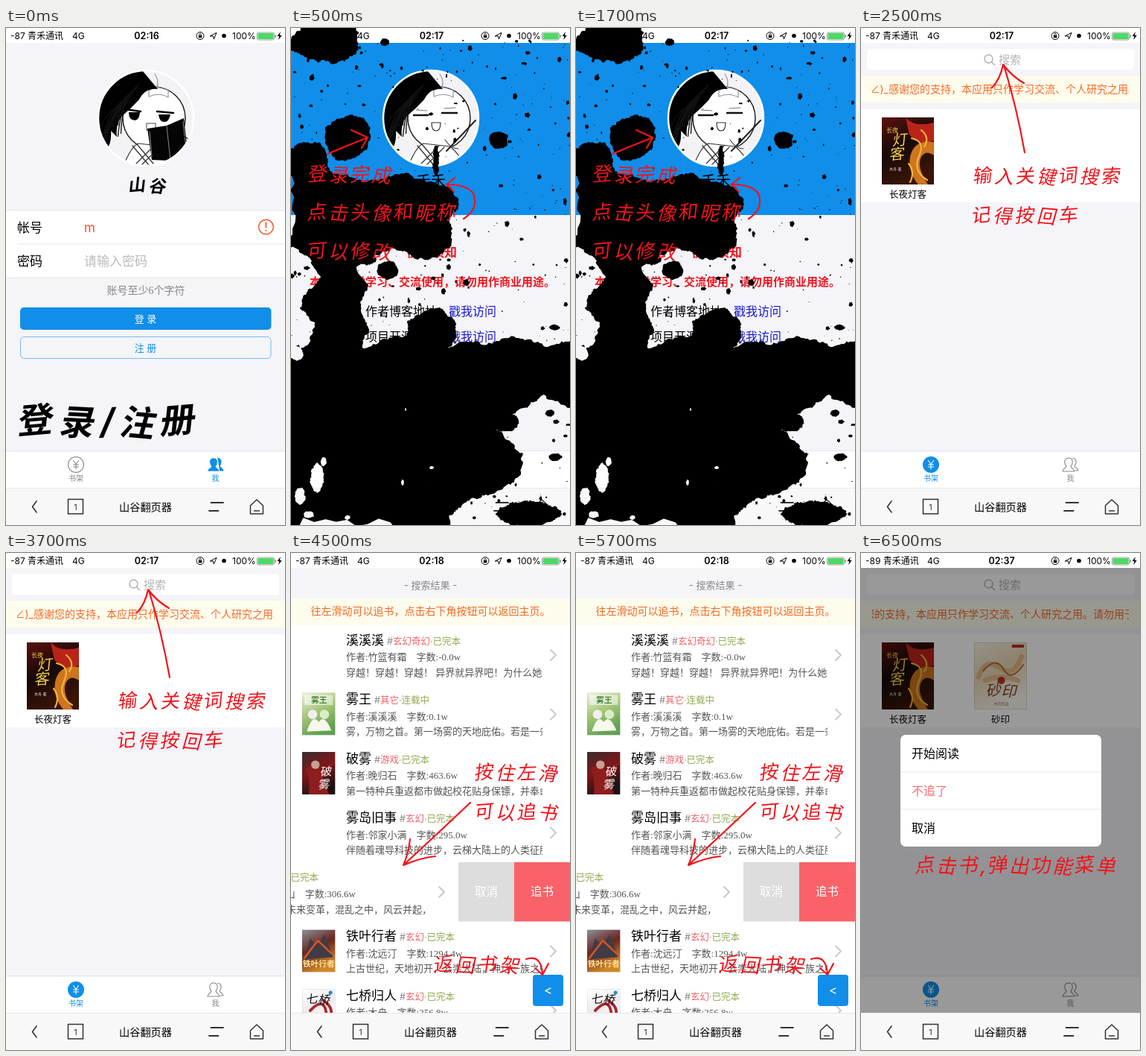
Write an HTML page that moves like this. It is 375 px wide and 667 px high and loops after 8000 ms.

```html
<!DOCTYPE html>
<html lang="zh-CN">
<head>
<meta charset="utf-8">
<title>阅读器演示</title>
<style>
html, body { margin: 0; width: 100%; height: 100%; overflow: hidden; background: #f4f4f9; }
svg { display: block; width: 100vw; height: 100vh; }
text { font-family: Inter, "Noto Sans CJK SC", "Noto Sans CJK", sans-serif; white-space: pre; }
.serif { font-family: "Liberation Serif", "Noto Sans CJK SC", "Noto Sans CJK", serif; }
</style>
</head>
<body>
<svg id="stage" viewBox="0 0 375 667" preserveAspectRatio="none"></svg>
<script>
const BLUE = '#108ee9', GRAY = '#888', PAGE = '#f4f4f9', RED = '#f3131b';
const APP = '山谷翻页器';

const rect = (x, y, w, h, fill, more = '') =>
  `<rect x="${x}" y="${y}" width="${w}" height="${h}" fill="${fill}" ${more}/>`;
const circle = (x, y, r, fill, more = '') =>
  `<circle cx="${x}" cy="${y}" r="${r}" fill="${fill}" ${more}/>`;
const line = (d, color, width = 1, more = '') =>
  `<path d="${d}" fill="none" stroke="${color}" stroke-width="${width}" stroke-linecap="round" stroke-linejoin="round" ${more}/>`;
const fillPath = (d, color, more = '') => `<path d="${d}" fill="${color}" ${more}/>`;
const text = (s, x, y, size, fill = '#000', more = '') =>
  `<text x="${x}" y="${y}" font-size="${size}" fill="${fill}" ${more}>${s}</text>`;
const mid = (s, x, y, size, fill, more = '') => text(s, x, y, size, fill, 'text-anchor="middle" ' + more);

// Slanted lettering with a slight wobble per character
function hand(s, x, y, size, color = RED, gap = 0, weight = 500) {
  const turn = [...s].map((c, i) => [-5, 3, -2, 5][i % 4]).join(' ');
  return `<g transform="translate(${x} ${y}) skewX(-11)">` +
    text(s, 0, 0, size, color, `rotate="${turn}" letter-spacing="${gap}" font-weight="${weight}"`) + '</g>';
}

function random(seed) {
  return () => {
    seed = (seed * 16807) % 2147483647;
    return seed / 2147483647;
  };
}

function statusBar(signal, time) {
  return rect(0, 0, 375, 20, '#fff') +
    text(`-${signal} 青禾通讯`, 6, 15, 12) + text('4G', 89, 15, 12) +
    mid(time, 189, 15, 12.5, '#000', 'font-weight="600"') +
    circle(261, 10.5, 5, 'none', 'stroke="#000"') +
    rect(258.8, 9.8, 4.4, 3.4, '#000') + line('M259.8 10V8.6a1.2 1.2 0 0 1 2.4 0V10', '#000', .8) +
    line('M274.5 10.8L283 6.2 279.4 15 278.6 11.2Z', '#000') +
    circle(293, 10.5, 2.8, '#000') +
    text('100%', 304, 15, 12) +
    rect(337.5, 6, 23, 10, '#fff', 'rx="2" stroke="#888" stroke-width=".8"') +
    rect(338.5, 7, 21, 8, '#4cd964', 'rx="1"') + rect(361.5, 9, 1.5, 4, '#888', 'rx=".7"') +
    fillPath('M369 5l-4.5 6h2.8l-1.2 5 4.7-6.3h-2.9z', '#000');
}

function browserBar() {
  return rect(0, 617, 375, 50, '#f8f8f8') + rect(0, 617, 375, .6, '#ddd') +
    line('M41 635L35.5 642.5 41 650', '#333', 1.6) +
    rect(83.5, 632.5, 20, 19.5, 'none', 'stroke="#333" stroke-width="1.5"') +
    mid('1', 93.5, 647, 11, '#333') +
    mid(APP, 187.5, 647.5, 14.2, '#000', 'font-weight="500"') +
    line('M275.5 637H292M273 648H285.5', '#333', 1.8) +
    line('M328.5 641L337 633 345.5 641V652H328.5ZM333.5 648H340.5', '#333', 1.5);
}

function person(color, solid) {
  const d = 'M279 577c-4 0-6 3-5 7 .5 2 1 3 2 4 0 3-5 2.5-5 7H286.5c0-4.5-4.5-4-4.5-7 1-1 2-2 2-4 1-4-1-7-5-7Z';
  const back = 'M284.5 577.5c3-.5 5 2 4.5 6-.3 2-1 3-2 4 0 3 4.5 2.5 5 6.5H287';
  return line(back, color, 1.1, solid ? `style="fill:${color}"` : '') +
    fillPath(d, solid ? color : '#fff', `stroke="${solid ? '#fff' : color}" stroke-width="${solid ? .6 : 1.1}"`);
}

function tabBar(active) {
  const shelf = active === 0, a = shelf ? BLUE : GRAY, b = shelf ? GRAY : BLUE;
  return rect(0, 568, 375, 49, '#fff') + rect(0, 567.5, 375, .8, '#ddd') +
    circle(94, 586, 10.5, shelf ? BLUE : 'none', `stroke="${a}" stroke-width="1.1"`) +
    line('M90.5 580.5L94 585.5 97.5 580.5M94 585.5V592M90.5 586H97.5M90.5 589H97.5', shelf ? '#fff' : GRAY, 1.1) +
    mid('书架', 94, 608, 10, a) + person(b, !shelf) + mid('我', 281.5, 608, 10, b);
}

function avatar(reading) {
  const rand = random(42);
  const strands = Array.from({ length: 16 }, (_, i) =>
    `M${178 - i * 2} ${76 + i * 2}q${-14 - rand() * 8} ${14 + rand() * 10} ${-18 - rand() * 14} ${42 + rand() * 24}`).join('');
  let face = rect(120, 54, 136, 136, '#f3f2f4') +
    circle(199, 121, 42, '#fff', 'stroke="#222" stroke-width="1.5"') +
    line('M200 62q6 8 3 17M192 84q12-8 26-1v10q-12-7-26-1z', '#98909f', 1.2) +
    fillPath('M158 185q10-26 20-30l36 4q14 12 20 28z', '#fff', 'stroke="#333" stroke-width="1.2"') +
    line('M170 158l22 26M176 156l22 26M199 158l-24 24M206 160l-24 24', '#333', 1.3) +
    fillPath('M122 108C132 76 158 56 184 58L204 82Q187 80 179 96Q168 108 155 119Q147 130 149 146L141 138Q142 154 136 162L132 147Q129 157 125 149Z', '#000') +
    line(strands, '#111', 1.3);
  if (reading) {
    face += line('M160 109l21 3M203 112l22 2', '#000', 2.5) +
      fillPath('M165 113h15q-1 11-7 11-8 0-8-11ZM205 116h16q-2 10-8 10-7 0-8-10Z', '#000') +
      rect(189, 128, 12, 9, '#fff', 'stroke="#444"') +
      fillPath('M190 135L216 131 239 121 244 165 221 178 196 177Z', '#050505') +
      line('M216 132L221 177M193 139l3 33M238 126l4 36', '#888') + line('M239 145l9 6-7 6', '#222', 1.3);
  } else {
    face += line('M165 117h19M203 114h20', '#111', 2.4) + line('M168 110l15 1M206 108l15-1', '#777') +
      line('M189 127h12q0 11-6 11t-6-11Z', '#333', 1.2) + line('M209 165L248 124', '#222', 2) +
      line('M207 150q8 12 18 12', '#444', 1.2);
  }
  return `<g clip-path="url(#face)">${face}</g>` + circle(188, 121, 64, 'none', 'stroke="#fff" stroke-width="2.5"');
}

function login() {
  return rect(0, 20, 375, 647, PAGE) + statusBar(87, '02:16') + avatar(true) +
    hand('山谷', 164, 220, 23, '#000', 4, 700) +
    rect(0, 245, 375, 90, '#fff') +
    [[0, 244.6], [15, 289.6], [0, 334.6]].map(([x, y]) => rect(x, y, 375, .7, '#ddd')).join('') +
    text('帐号', 15, 274, 17) + text('m', 105, 273.5, 17, '#f4511e') +
    circle(349.5, 267, 9.8, 'none', 'stroke="#f4511e" stroke-width="1.4"') +
    line('M349.5 261v7', '#f4511e', 1.6) + circle(349.5, 271.7, 1, '#f4511e') +
    text('密码', 15, 318.5, 17) + text('请输入密码', 105, 318.5, 17, '#bbb') +
    mid('账号至少6个字符', 188, 356.5, 14, GRAY, 'class="serif"') +
    rect(19, 375, 337.5, 30, BLUE, 'rx="5"') + mid('登 录', 187.5, 395, 13, '#fff') +
    rect(19.5, 414.5, 336.5, 29, 'none', `rx="5" stroke="${BLUE}" stroke-opacity=".7" stroke-width=".8"`) +
    mid('注 册', 187.5, 434, 13, BLUE) +
    hand('登录/注册', 15, 545, 47, '#000', 8, 700) + tabBar(1) + browserBar();
}

// Closed outline roughened by repeated midpoint displacement
function rough(points, rand, wild = .2) {
  let p = points;
  for (let pass = 0; pass < 4; pass++) {
    p = p.flatMap(([x, y], i) => {
      const [u, v] = p[(i + 1) % p.length], k = (rand() - .5) * wild * (1 + pass * .6);
      return [[x, y], [(x + u) / 2 + (v - y) * k, (y + v) / 2 - (u - x) * k]];
    });
  }
  return 'M' + p.map(q => q.map(n => n.toFixed(1)).join(' ')).join('L') + 'Z';
}

function oval(x, y, rx, ry, rand, n = 12) {
  const ring = Array.from({ length: n }, (_, i) => {
    const a = i / n * Math.PI * 2, k = .88 + rand() * .22;
    return [x + Math.cos(a) * rx * k, y + Math.sin(a) * ry * k];
  });
  return rough(ring, rand, .25);
}

function ink() {
  const rand = random(7319);
  const upper = [[-8, 162], [28, 157], [48, 170], [52, 192], [95, 205], [130, 198], [160, 197], [192, 207], [216, 216],
    [225, 238], [213, 262], [216, 288], [196, 308], [168, 310], [138, 296], [112, 306], [88, 320], [104, 345], [94, 375],
    [103, 400], [98, 435], [18, 438], [32, 395], [12, 375], [24, 350], [40, 335], [22, 306], [-8, 292]];
  const lower = [[-8, 446], [25, 422], [98, 430], [150, 415], [205, 430], [245, 422], [300, 414], [345, 428], [383, 416],
    [383, 510], [340, 492], [305, 513], [275, 540], [311, 570], [300, 610], [262, 626], [230, 640], [212, 655], [214, 675], [-8, 675]];
  let d = rough(upper, rand, .2) + rough(lower, rand, .2);
  const blobs = [[46, 20, 49, 28], [76, 148, 31, 31], [279, 150, 13, 12], [188, 410, 34, 32], [130, 325, 14, 13],
    [320, 652, 44, 18], [26, 167, 24, 14], [102, 310, 14, 8], [355, 576, 9, 5], [348, 517, 6, 5], [126, 19, 6, 5],
    [195, 178, 4, 22], [354, 402, 7, 4], [288, 530, 18, 12]];
  blobs.forEach(b => { d += oval(...b, rand); });
  for (let i = 0; i < 520; i++) {
    const x = rand() * 375, y = 16 + rand() * 646, r = .6 + 3 * rand() ** 3;
    d += oval(x, y, r * (.6 + rand() * .8), r * (.6 + rand()), rand, 5);
  }
  let holes = '';
  [[8, 437, 9, 9], [35, 604, 9, 20], [12, 628, 7, 12], [44, 582, 4, 6], [24, 653, 7, 5], [76, 657, 4, 3],
    [150, 610, 2, 4], [189, 590, 3, 2], [154, 512, 1, 2]].forEach(h => { holes += oval(...h, rand); });
  return `<mask id="gaps">${rect(0, 0, 375, 667, '#fff')}${fillPath(holes, '#000')}</mask>` +
    fillPath(d, '#000', 'mask="url(#gaps)"');
}

function profile() {
  const bold = 'font-weight="700"';
  return rect(0, 20, 375, 231, BLUE) + rect(0, 251, 375, 416, PAGE) + statusBar(87, '02:17') + avatar(false) +
    mid('禾禾', 188, 213, 20) + mid('使用须知', 189, 307, 17, RED, bold) +
    text('本应用只供学习、交流使用，请勿用作商业用途。', 25, 346, 15, RED, bold) +
    text('作者博客地址：', 100, 386, 16) + text('戳我访问', 212, 386, 16, '#1a1ad0') +
    text('项目开源地址：', 100, 420, 16) + text('戳我访问', 212, 420, 16, '#1a1ad0') +
    tabBar(1) + rect(0, 568, 375, 49, '#fff') + browserBar() + ink() +
    hand('登录完成', 22, 206, 26, RED, 2.5) + hand('点击头像和昵称', 21, 257, 26, RED, 3) + hand('可以修改', 21, 309, 26, RED, 3) +
    line('M49 169Q75 158 103 147M81 137L103 147 95 161', RED, 2.2) +
    line('M232 256Q253 242 245 222Q236 210 210 210M220 201L209 210 219 220', RED, 2.2);
}

const grads = {
  night: ['#5c120d', '#170807', '#3a1507'],
  sand: ['#f8f3e4', '#ead8b5', '#faf7ef'],
  leaf: ['#f0f5df', '#a9c77b', '#62a052'],
  dusk: ['#3a2d32', '#7d1717', '#1c1114'],
  iron: ['#8d8f9a', '#6a2722', '#d18728'],
  snow: ['#fff', '#ecebed', '#fff']
};

function cover(x, y, w, h, tone, art, words) {
  return `<svg x="${x}" y="${y}" width="${w}" height="${h}" viewBox="0 0 70 90" preserveAspectRatio="none">` +
    rect(0, 0, 70, 90, `url(#${tone})`) + art + words + rect(0, 0, 70, 90, 'none', 'stroke="#0003"') + '</svg>';
}

const nightCover = () => cover(28, 120, 70, 90, 'night',
  fillPath('M32 0Q43 14 70 7V31Q50 40 37 23Z', '#ba2418') +
  fillPath('M70 33Q43 29 38 53Q35 73 49 90H62Q46 66 53 53Q59 43 70 51Z', '#ce751f') +
  line('M40 28q19 4 10 24t11 32M53 17q12 10 4 22M36 62q9 11 2 25', '#f0b43c', 2.2),
  text('长夜', 6, 20, 8, '#f4d247') + hand('灯', 14, 38, 20, '#f4d247') + hand('客', 10, 57, 20, '#f4d247') +
  text('木舟 著', 10, 71, 5, '#ddd'));

const sandCover = () => cover(152, 120, 71, 90, 'sand',
  line('M6 46Q15 20 34 34T63 19M15 51Q35 42 58 51', '#d79b55', 7, 'opacity=".5"') +
  line('M12 38Q29 18 39 36T65 30', '#b86b34', 2) + rect(50, 3, 16, 4, '#b33226') + circle(36, 51, 5, '#b33226'),
  hand('砂印', 16, 72, 20, '#7d4422') + mid('木舟作品', 36, 84, 5, '#9b6c42'));

const notice = (x, s) => rect(0, 64, 375, 36, '#fefcec') +
  `<g clip-path="url(#ticker)">` + text('∠)_', x, 87, 14, '#f76a24', 'text-anchor="end"') +
  text(s, x, 87, 14, '#f76a24') + '</g>';

function shelf(signal, time, x, second) {
  return rect(0, 20, 375, 647, PAGE) + statusBar(signal, time) +
    rect(8, 28, 359, 28, '#fff', 'rx="4"') + circle(171.5, 41.5, 5.5, 'none', 'stroke="#aaa" stroke-width="1.3"') +
    line('M175.5 45.5l4 4', '#aaa', 1.4) + text('搜索', 185, 47.5, 15, '#b5b5b5') +
    notice(x, '感谢您的支持，本应用只作学习交流、个人研究之用。请勿用于商业用途') +
    rect(0, 109, 375, 125, '#fff') + nightCover() + mid('长夜灯客', 63, 228, 12.5) +
    (second ? sandCover() + mid('砂印', 187.5, 228, 12.5) : '') + tabBar(0);
}

function bookshelf() {
  return shelf(87, '02:17', 37, false) + browserBar() +
    hand('输入关键词搜索', 150, 208, 25.5, RED, 3.2) + hand('记得按回车', 148, 261, 25.5, RED, 3.8) +
    line('M220 167Q209 105 192 50M176 80Q187 69 191 49Q202 64 219 74', RED, 2.2);
}

const books = [
  ['溪溪溪', '玄幻奇幻', '已完本', '竹篮有霜', '-0.0', '穿越！穿越！穿越！ 异界就异界吧！为什么她'],
  ['雾王', '其它', '连载中', '溪溪溪', '0.1', '雾，万物之首。第一场雾的天地庇佑。若是一条路'],
  ['破雾', '游戏', '已完本', '晚归石', '463.6', '第一特种兵重返都市做起校花贴身保镖，并奉命'],
  ['雾岛旧事', '玄幻', '已完本', '邻家小满', '295.0', '伴随着魂导科技的进步，云梯大陆上的人类征服了'],
  null,
  ['铁叶行者', '玄幻', '已完本', '沈远汀', '1294.4', '上古世纪，天地初开，云崇大陆，神话一族之中'],
  ['七桥归人', '玄幻', '已完本', '木舟', '256.8', '七座古桥横跨天地，少年独自踏上归途，寻找家']
];

function smallCover(i, y) {
  const at = [15, y + 11, 44.5, 57];
  if (i === 1) return cover(...at, 'leaf', rect(5, 5, 60, 21, '#fff8') +
    circle(22, 46, 10, '#eee') + circle(47, 46, 10, '#d8edc7') + fillPath('M10 82q12-38 25-20 12-18 27 18z', '#f7f8ec'),
    mid('雾王', 36, 21, 17, '#49883b', 'font-weight="700"'));
  if (i === 2) return cover(...at, 'dusk', fillPath('M14 90Q17 52 7 36L26 24 38 39 70 20 44 56 57 90Z', '#8e1d1d') +
    circle(28, 27, 9, '#c7a191'), hand('破', 38, 51, 24, '#fff') + hand('雾', 34, 78, 24, '#fff'));
  if (i === 5) return cover(...at, 'iron', fillPath('M5 63L17 18 31 35 48 10 65 58Z', '#403b45') +
    line('M5 60L33 23 65 53', '#d2562b', 4), mid('铁叶行者', 35, 78, 17, '#ffe49b', 'font-weight="700"'));
  return cover(...at, 'snow', line('M14 74Q56 87 51 51T17 46M45 25Q72 42 55 68', '#a82830', 6) + circle(60, 8, 4, '#248bc4'),
    hand('七桥', 8, 31, 25, '#111'));
}

function item(book, i) {
  const y = 97 + i * 79.5, serif = 'class="serif"';
  const chevron = x => line(`M${x} ${y + 33}l7 7-7 7`, '#c7c7cc', 1.8);
  if (!book) {
    return rect(0, y, 225, 79.5, '#fff') + text('·已完本', 37, y + 25, 12.5, '#8faa50', 'text-anchor="end"') +
      text('山    字数:306.6w', 87, y + 47, 13, '#555', serif + ' text-anchor="end"') + chevron(199) +
      `<g clip-path="url(#slid)">${text('未来变革，混乱之中，风云并起，谁主', -6, y + 67.5, 13, '#555', serif)}</g>` +
      rect(225, y, 75, 79.5, '#ddd') + rect(300, y, 75, 79.5, '#f96268') +
      mid('取消', 262.5, y + 45, 15.5, '#fff') + mid('追书', 337.5, y + 45, 15.5, '#fff');
  }
  const [title, kind, state, author, words, about] = book;
  return ([1, 2, 5, 6].includes(i) ? smallCover(i, y) : '') +
    `<text x="74" y="${y + 25.5}" font-size="17">${title}<tspan font-size="12.5" dx="4" fill="#888">#</tspan>` +
    `<tspan font-size="12.5" fill="#f76165">${kind}</tspan><tspan font-size="12.5" fill="#8faa50">·${state}</tspan></text>` +
    text(`作者:${author}    字数:${words}w`, 74, y + 47, 13, '#555', serif) +
    `<g clip-path="url(#about)">${text(about, 74, y + 67.5, 13, '#555', serif)}</g>` + chevron(349);
}

function results() {
  return rect(0, 20, 375, 647, '#fff') + rect(0, 20, 375, 41, PAGE) + statusBar(87, '02:18') +
    mid('- 搜索结果 -', 187.5, 47.5, 13, GRAY) + rect(0, 61, 375, 35.5, '#fefcec') +
    mid('往左滑动可以追书，点击右下角按钮可以返回主页。', 187.5, 83, 14, '#f76a24') +
    books.map(item).join('') +
    rect(325, 566, 41, 42, BLUE, 'rx="4"') + mid('&lt;', 345.5, 593, 17, '#fff') + browserBar() +
    hand('按住左滑', 246, 304, 25.5, RED, 3) + hand('可以追书', 246, 357, 25.5, RED, 3) +
    line('M241 335Q203 371 152 418M160 384Q158 403 151 419Q174 409 194 407', RED, 2.2) +
    hand('返回书架', 191, 562, 26, RED, 3.5) + line('M316 545Q336 538 338 565M328 557L338 566 346 551', RED, 2.2);
}

function menu() {
  return shelf(89, '02:37', -24, true) + rect(0, 20, 375, 597, '#000', 'fill-opacity=".4"') + browserBar() +
    rect(53, 244, 270, 150, '#fff', 'rx="7"') + rect(53, 293.6, 270, .7, '#ddd') + rect(53, 343.6, 270, .7, '#ddd') +
    text('开始阅读', 68, 275, 16) + text('不追了', 68, 325, 16, '#fc6a72') + text('取消', 68, 375, 16) +
    hand('点击书,弹出功能菜单', 72, 429, 26.5, RED, 2.6);
}

const clip = (id, shape) => `<clipPath id="${id}">${shape}</clipPath>`;
const defs = '<defs>' + clip('face', circle(188, 121, 64, '#000')) + clip('ticker', rect(15, 64, 345, 36, '#000')) +
  clip('about', rect(74, 97, 264, 570, '#000')) + clip('slid', rect(0, 415, 188, 80, '#000')) +
  Object.entries(grads).map(([id, colors]) => `<linearGradient id="${id}" x2=".4" y2="1">` +
    colors.map((c, i) => `<stop offset="${i / 2}" stop-color="${c}"/>`).join('') + '</linearGradient>').join('') + '</defs>';

const scenes = [[0, login], [500, profile], [2500, bookshelf], [4500, results], [6500, menu]];
const LOOP = 8000;
const stage = document.getElementById('stage');
stage.innerHTML = defs + scenes.map(([, draw]) => `<g class="scene">${draw()}</g>`).join('');
const groups = stage.querySelectorAll('.scene');

function render(time) {
  const t = time % LOOP;
  const current = scenes.filter(([start]) => t >= start).length - 1;
  groups.forEach((g, i) => { g.style.display = i === current ? '' : 'none'; });
}

const begin = performance.now();
function tick() {
  render(performance.now() - begin);
  requestAnimationFrame(tick);
}
render(0);
requestAnimationFrame(tick);
</script>
</body>
</html>
```
